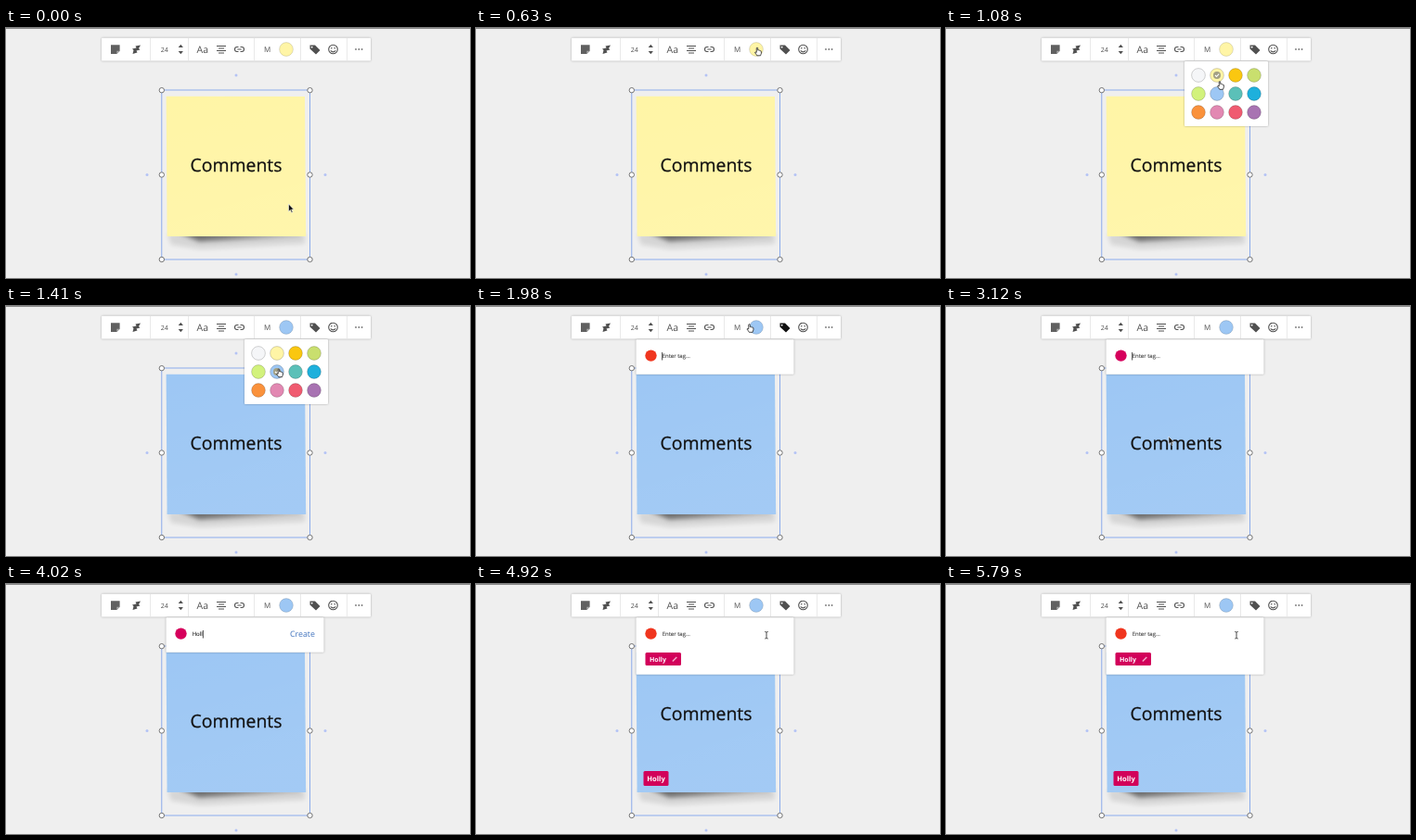
Animation of 500 by 270 pixels, one loop 5.82 s. Source, as an HTML page:

```html
<!DOCTYPE html>
<html lang="en">
<head>
<meta charset="utf-8">
<title>Sticky note tagging</title>
<style>
html, body { margin: 0; width: 100%; height: 100%; overflow: hidden; background: #efefef; }
svg { display: block; width: 500px; height: 270px; font-family: "Open Sans", "Noto Sans", sans-serif; }
text { text-rendering: geometricPrecision; }
.card { fill: #fff; filter: drop-shadow(0 .8px 1.2px rgba(0,0,0,.3)); }
.line { fill: none; stroke: #505050; stroke-width: 1.1; }
.chip { fill: #d2005a; }
.bold { font-weight: 700; fill: #fff; }
</style>
</head>
<body>
<svg viewBox="0 0 500 270">
  <defs>
    <filter id="soft" x="-20%" y="-80%" width="140%" height="260%"><feGaussianBlur stdDeviation="2.6"/></filter>
    <linearGradient id="shade" x1="0" y1="0" x2="1" y2="0">
      <stop stop-color="#000" stop-opacity=".55"/>
      <stop offset=".4" stop-color="#000" stop-opacity=".42"/>
      <stop offset="1" stop-color="#000" stop-opacity=".12"/>
    </linearGradient>
    <linearGradient id="sheen" x1="0" y1="0" x2=".3" y2="1">
      <stop stop-color="#fff" stop-opacity="0"/>
      <stop offset="1" stop-color="#fff" stop-opacity=".06"/>
    </linearGradient>
  </defs>
  <rect width="500" height="270" fill="#efefef"/>
  <rect width="500" height="1" fill="#8c8c8c"/>

  <!-- note -->
  <path d="M174 222H322V233L210 239L178 234Z" fill="#000" opacity=".1" filter="url(#soft)"/>
  <path d="M180 218H318V225L208 230.5Z" fill="url(#shade)" filter="url(#soft)"/>
  <path class="paint" d="M172.6 73.7L322 74L323.2 225H173.6Z"/>
  <path d="M172.6 73.7L322 74L323.2 225H173.6Z" fill="url(#sheen)"/>
  <text id="label" x="248" text-anchor="middle" font-size="19.4" fill="#111" stroke="#111" stroke-width=".25">Comments</text>
  <g id="noteTag">
    <rect class="chip" x="180.5" y="202" width="27" height="16" rx="1.5"/>
    <text class="bold" x="194" y="212.8" text-anchor="middle" font-size="7.6">Holly</text>
  </g>

  <!-- selection -->
  <rect x="167.8" y="67" width="159.7" height="183" fill="none" stroke="#7fa3ea" stroke-width=".9"/>
  <g id="handles" fill="#fff" stroke="#666" stroke-width=".9"></g>
  <g id="dots" fill="#b4c3f5"></g>

  <!-- toolbar -->
  <rect class="card" x="103" y="10.7" width="290" height="24.8" rx="1"/>
  <path d="M155.5 11V35M196.5 11V35M267.5 11V35M317.5 11V35M367.5 11V35" stroke="#e9e9e9"/>
  <g fill="#505050">
    <path d="M113 18.2H122.6V24.8L119.4 28H113Z" fill="#606060"/><path d="M119.4 28V24.8H122.6" fill="#aaa"/>
    <path d="M145 18.5L139.5 19.5L140.5 21.5L136 22.5L137.5 24L136.5 28L141.5 26.5L140.5 24.5L144.5 23.5L143 22Z"/>
    <text x="166.7" y="25.5" font-size="7">24</text>
    <path d="M185.7 21L188.3 17.8L190.9 21ZM185.7 25L188.3 28.2L190.9 25Z"/>
    <text x="205.5" y="26.8" font-size="10.5">Aa</text>
    <path class="line" d="M227 19.5H237M229 22H235M227 24.5H237M229 27H235"/>
    <path class="line" d="M250.5 20.5H249A2.5 2.5 0 0 0 249 25.5H250.5M252.5 20.5H254A2.5 2.5 0 0 1 254 25.5H252.5M249.3 23H253.7"/>
    <text x="278" y="26" font-size="8">M</text>
    <circle class="paint" cx="302" cy="23" r="7.4" stroke="#000" stroke-opacity=".18" stroke-width=".7"/>
    <path id="tagIcon" fill-rule="evenodd" d="M327.5 18.5H333L338.5 24L334 28.5L327.5 22.5ZM329.6 19.7a.9 .9 0 1 0 .1 0Z"/>
    <circle class="line" cx="352.5" cy="23" r="4.8"/>
    <circle cx="350.8" cy="21.8" r=".8"/><circle cx="354.2" cy="21.8" r=".8"/>
    <path class="line" d="M349.8 24.3Q352.5 27.4 355.2 24.3"/>
    <g fill="#777"><circle cx="377" cy="23" r=".9"/><circle cx="380.3" cy="23" r=".9"/><circle cx="383.6" cy="23" r=".9"/></g>
  </g>

  <g id="notePicker"></g>

  <!-- tag panel -->
  <g id="panel">
    <rect id="panelBox" class="card" x="172.5" y="36.3" width="170" rx="1"/>
    <circle id="tagDot" cx="188.5" cy="53.6" r="6.2"/>
    <text id="field" x="200.7" y="56.3" font-size="6" stroke-width=".12"></text>
    <rect id="caret" y="50" width=".8" height="8.5" fill="#222"/>
    <text id="create" x="306" y="57.3" font-size="8.8" fill="#3f72bd">Create</text>
    <g id="listTag">
      <rect class="chip" x="182.5" y="74" width="38.5" height="14" rx="1.5"/>
      <text class="bold" x="187" y="83.5" font-size="7">Holly</text>
      <path d="M211.8 83.6L216.3 79.1" stroke="#f3a9c8" stroke-width="1.4"/>
    </g>
  </g>
  <g id="tagPicker"></g>

  <!-- pointers -->
  <g id="cursor" stroke-linejoin="round">
    <path id="arrow" d="M0 0V8.2L1.9 6.5L3.2 9.4L4.5 8.8L3.2 6H5.7Z" fill="#111" stroke="#fff" stroke-width=".6"/>
    <path id="hand" transform="scale(.9)" d="M-.8 .6Q0 -.5 .8 .6V3.4Q1.8 2.8 2.3 3.7Q3.2 3.2 3.7 4.1Q4.8 3.8 4.9 5V7Q4.4 8.3 4 9.8H-.2Q-1 8.3 -2.7 6.2Q-2.8 4.8 -.8 6Z" fill="#fff" stroke="#222" stroke-width=".9"/>
    <path id="beam" d="M-1.7 -3.5Q0 -3.5 0 -2.5Q0 -3.5 1.7 -3.5M0 -2.5V3M-1.7 4Q0 4 0 3Q0 4 1.7 4" fill="none" stroke="#333" stroke-width=".9"/>
  </g>
</svg>
<script>
const LOOP = 5820, YELLOW = '#fff5a6', BLUE = '#9dc7f4', RED = '#f0361f', PINK = '#d6005c';
const $ = id => document.getElementById(id);
const show = (id, on) => $(id).style.display = on ? '' : 'none';
const circle = (x, y, r, extra = '') => `<circle cx="${x}" cy="${y}" r="${r}" ${extra}/>`;

$('handles').innerHTML = [67.2, 158.5, 250].map(y => circle(167.8, y, 2.7) + circle(327.5, y, 2.7)).join('');
$('dots').innerHTML = [[248, 51], [152, 158.5], [344, 158.5], [248, 266]].map(p => circle(...p, 1.5)).join('');

function buildPicker(id, x, y, colors, badge) {
  const swatches = colors.split(' ').map((c, i) =>
    circle(x + 15 + i % 4 * 20, y + 15 + Math.floor(i / 4) * 20, 7.4,
      `fill="#${c}" stroke="#000" stroke-opacity=".22" stroke-width=".8"`)).join('');
  $(id).innerHTML = `<rect class="card" x="${x}" y="${y}" width="90" height="70" rx="1"/>${swatches}
    <g class="mark">${badge ? circle(0, 0, 4, 'fill="#a3a084"') : ''}
    <path d="M-2 0L-.5 1.5L2.2 -1.4" fill="none" stroke="#fff" stroke-width="1.1"/></g>`;
}
buildPicker('notePicker', 257, 36,
  'f5f6f8 fff5a6 fac710 c9df6e d2f27c 9dc7f4 5bc0b8 1eb0dc fa923c e288b2 f05b70 a873b2', true);
buildPicker('tagPicker', 182, 65,
  'f0361f c0e03c 1bc3d1 fbc714 d6005c 82cb48 2296dd 808080 8f10a6 0b9f82 5f4596 101010');
const place = (picker, x, y) =>
  $(picker).querySelector('.mark').setAttribute('transform', `translate(${x} ${y})`);

// [time, x, y] of the pointer tip
const path = [[0, 304.5, 190], [120, 304.5, 190], [570, 303, 21], [780, 303, 21], [1080, 295, 57.5],
  [1200, 293, 69], [1380, 293, 69], [1710, 332, 21], [1860, 332, 21], [1980, 294.5, 19.5],
  [2310, 188, 52], [2490, 188, 52], [2640, 192.5, 89.5], [2730, 196, 98], [2820, 196, 98],
  [3000, 240, 141], [4380, 240, 141], [4740, 313, 55], [LOOP, 313, 55]];
const kinds = [[0, 'arrow'], [530, 'hand'], [2040, 'arrow'], [2270, 'hand'], [2850, 'arrow'],
  [3390, ''], [4380, 'arrow'], [4620, 'beam'], [4710, 'hand'], [4890, 'beam']];
const typing = [[0, ''], [3420, 'H'], [3630, 'Ho'], [3810, 'Hol'], [3990, 'Holl'], [4290, 'Holly'], [4860, '']];
const stepAt = (list, t) => list.filter(s => s[0] <= t).pop()[1];

function pointer(t) {
  const i = path.findIndex(p => p[0] > t), [t0, x0, y0] = path[i - 1], [t1, x1, y1] = path[i];
  const u = (t - t0) / (t1 - t0), e = u * u * (3 - 2 * u);
  return [x0 + (x1 - x0) * e, y0 + (y1 - y0) * e];
}

function draw(now) {
  const t = now % LOOP, picked = t >= 1260, created = t >= 4860, pink = t >= 2760 && !created;
  document.querySelectorAll('.paint').forEach(el => el.setAttribute('fill', picked ? BLUE : YELLOW));
  $('label').setAttribute('y', created ? 146.5 : 154.5);
  show('noteTag', created);
  show('listTag', created);

  show('notePicker', t >= 690 && t < 1470);
  place('notePicker', 292, picked ? 71 : 51);
  $('tagIcon').setAttribute('fill', t >= 1680 && t < 2040 ? '#111' : '#505050');

  show('panel', t >= 1830);
  $('panelBox').setAttribute('height', created ? 61.5 : 37.5);
  $('tagDot').setAttribute('fill', pink ? PINK : RED);
  show('tagPicker', t >= 2460 && t < 2880);
  place('tagPicker', 197, pink ? 100 : 80);

  const typed = stepAt(typing, t), ink = typed ? '#222' : '#444';
  $('field').textContent = typed || 'Enter tag...';
  $('field').setAttribute('fill', ink);
  $('field').setAttribute('stroke', ink);
  show('create', typed);
  show('caret', t < 2460 || t >= 2940 && !created);
  $('caret').setAttribute('x', 200.3 + (typed ? $('field').getComputedTextLength() + .5 : 0));

  const kind = stepAt(kinds, t);
  ['arrow', 'hand', 'beam'].forEach(k => show(k, k === kind));
  $('cursor').setAttribute('transform', `translate(${pointer(t)})`);
}

let start;
function tick(now) {
  start ??= now;
  draw(now - start);
  requestAnimationFrame(tick);
}
draw(0);
requestAnimationFrame(tick);
</script>
</body>
</html>
```
